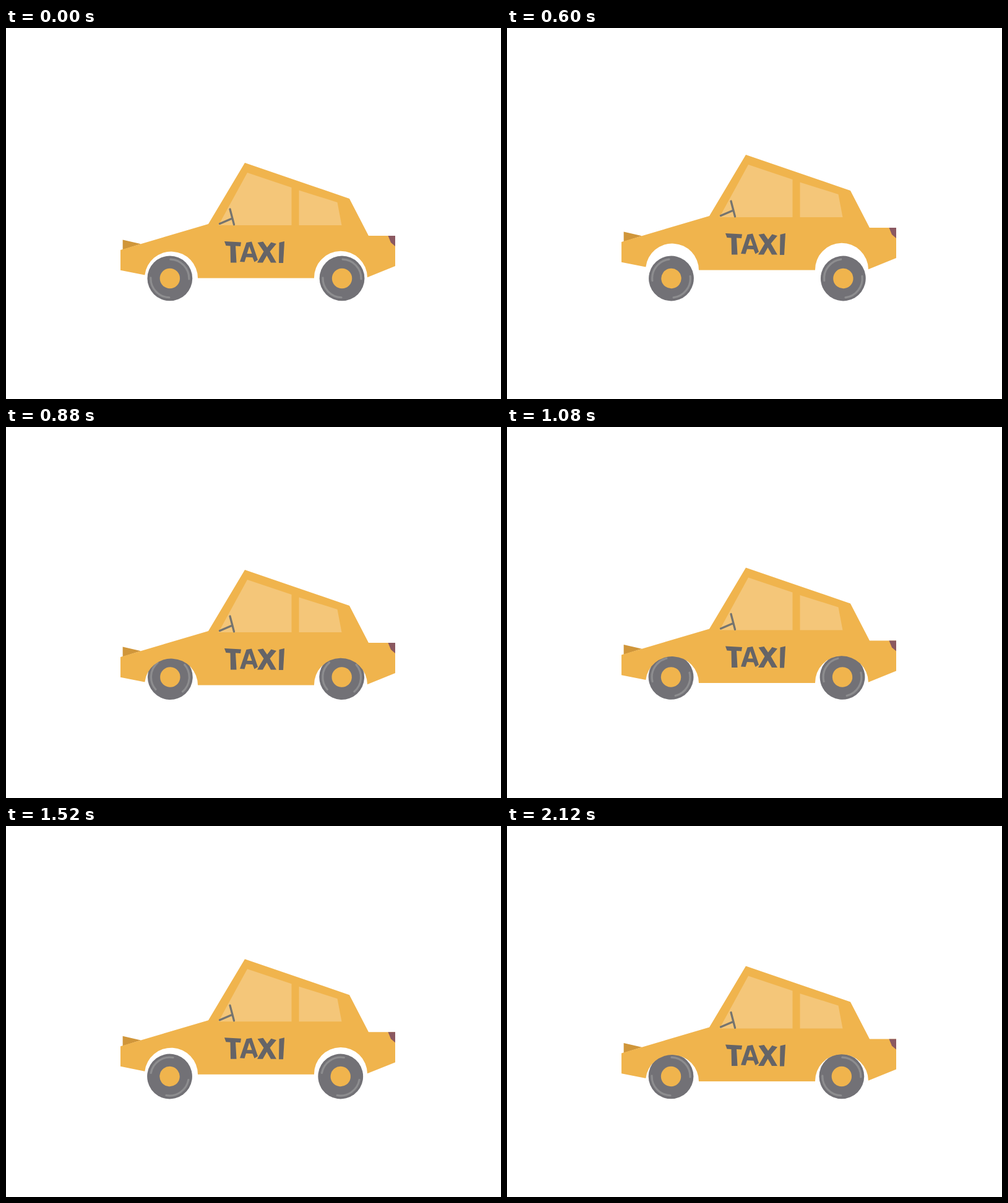
An HTML page for the animation above (2.16 s loop, 800x600 px).

```html
<!DOCTYPE html>
<html lang="en">
<head>
<meta charset="utf-8">
<title>Taxi</title>
<style>
html, body { margin: 0; width: 100%; height: 100%; overflow: hidden; background: #fff; }
svg { display: block; width: 800px; height: 600px; }
</style>
</head>
<body>
<svg viewBox="0 0 800 600">
  <defs>
    <g id="wheel">
      <circle r="36.4" fill="#727176"/>
      <path d="M1-30.8A31 31 0 0 1 31 1M-1 30.8A31 31 0 0 1-31-1" fill="none" stroke="#8d8d8f" stroke-width="3.2" stroke-linecap="round"/>
      <circle r="16.2" fill="#f0b44d"/>
    </g>
  </defs>
  <use id="front" href="#wheel"/>
  <use id="rear" href="#wheel"/>
  <g id="car">
    <path d="M188.6 342.5L218 349.3 188.6 358.5z" fill="#d0963a"/>
    <path d="M386 218L555 276 586 336H629V385L584 403.2A43 43 0 0 0 498 404.5H310A43 43 0 0 0 224.3 399.5L185 391.7V359L327 317z" fill="#f0b44d"/>
    <path d="M617.5 336H629V353L622 347z" fill="#8b5860"/>
    <path d="M390 234L461.5 258V319H343.5zM473.5 262.5L535.5 282 542.5 319H473.5z" fill="#f4c679"/>
    <path d="M362 293L368.5 317.8M345.5 316.6L366 307.8" stroke="#75746f" stroke-width="3.3" stroke-linecap="round"/>
    <g fill="#656467" fill-rule="evenodd" role="img" aria-label="TAXI">
      <path d="M353 345L380 346.5 379 353 371 352.5 372.5 379.5H363L362.5 352.5 355.5 352z"/>
      <path d="M378 378L388.5 347 397 345.5 407 375 401.5 378.5 398.5 371 388 370.5 385.5 378.5zM389.5 365L393.2 353 397.5 365z"/>
      <path d="M406.5 347L415.5 345.5 422 355 428.5 346.5 437 349 426.5 361.5 437 379.5H428L421.5 368 415 379.5H406L416.5 361.5z"/>
      <path d="M441.5 347L450 345 448 380H441z"/>
    </g>
  </g>
</svg>
<script>
const LOOP = 2160, STEP = 40, TURN_END = 2120, TURNS = 4.5;

// Bumps in the road: [time, drop]
const bumps = [[0, 0], [320, 1], [600, -13], [880, 13], [1240, 7], [1540, -3], [1800, 6], [TURN_END, 8.5]];

function bounce(t) {
  const i = bumps.findIndex(([end]) => t < end);
  if (i < 0) return bumps.at(-1)[1];
  const [t0, a] = bumps[i - 1], [t1, b] = bumps[i];
  const u = (t - t0) / (t1 - t0);
  return a + (b - a) * u * u * (3 - 2 * u);
}

const sway = (t, centre, size, peak, period) =>
  centre + size * Math.cos((t - peak) / period * 2 * Math.PI);

const move = (id, x, y, turn = 0) => document.getElementById(id)
  .setAttribute("transform", `translate(${x} ${y}) rotate(${turn})`);

const start = performance.now();
function draw() {
  const elapsed = (performance.now() - start) % LOOP;
  const t = Math.floor(elapsed / STEP) * STEP;
  const turn = -360 * TURNS * t / TURN_END;
  const wheelY = sway(t, 404.85, 0.45, 320, 1480);
  move("car", 0, bounce(t));
  move("front", sway(t, 265, 0.5, 600, 2000), wheelY, turn);
  move("rear", sway(t, 542, 1.55, 380, 2830), wheelY, turn);
  requestAnimationFrame(draw);
}
draw();
</script>
</body>
</html>
```
